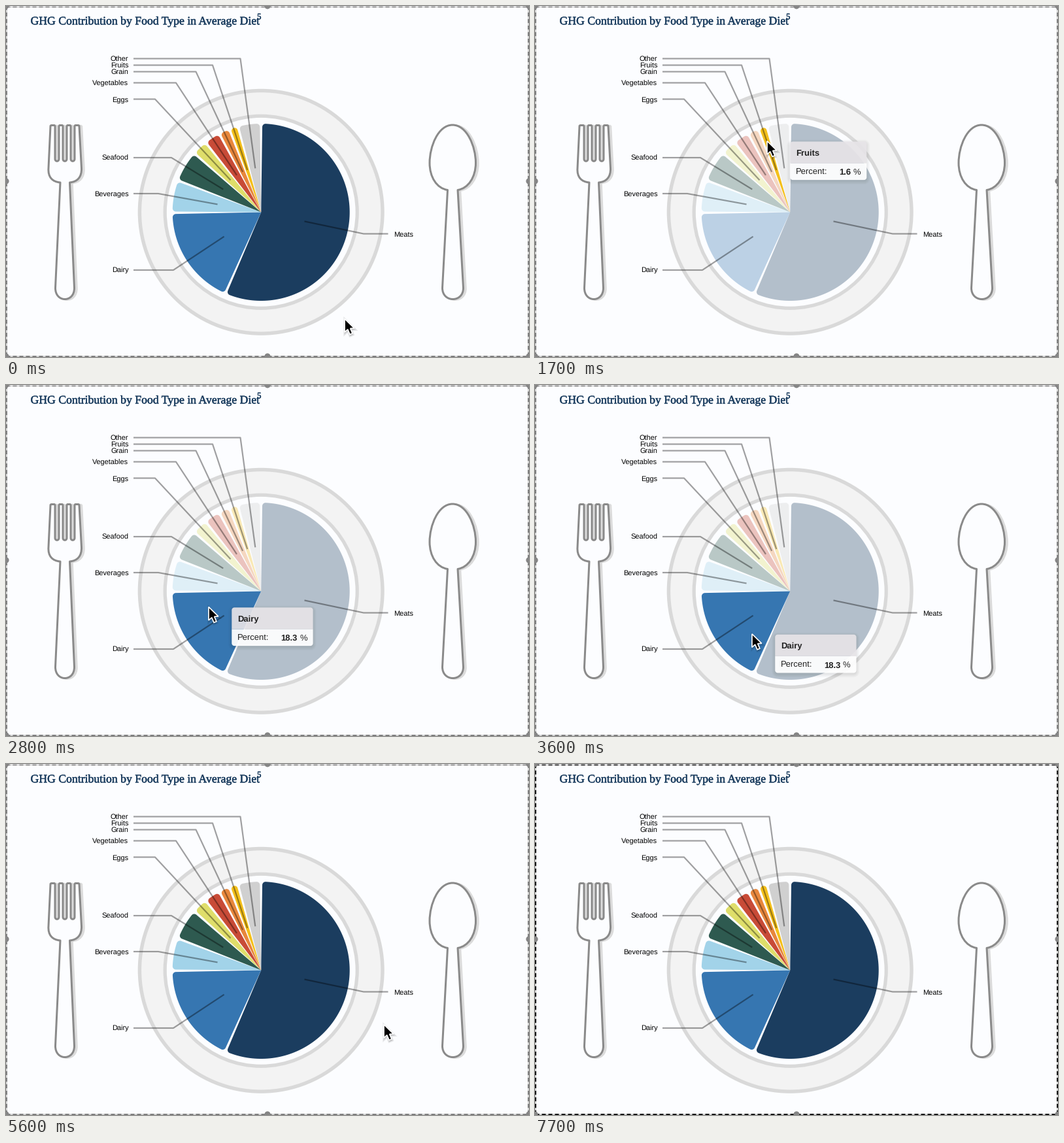
A matplotlib script that plays this animation: 800x537 px, repeating every 7.8 s.

```python
import numpy as np
import matplotlib.pyplot as plt
from matplotlib.animation import FuncAnimation
from matplotlib.patches import Circle, PathPatch, Polygon
from matplotlib.path import Path
from matplotlib.patheffects import withStroke

plt.rcParams.update({"text.hinting": "none", "text.hinting_factor": 1})

W, H, DPI = 800, 537, 100
FRAMES, INTERVAL = 78, 100
PX = 72 / DPI  # points per pixel
PAGE, NAVY = "#fcfdff", "#1b3d5f"
CX, CY, R = 390.2, 315.5, 135.5
FADED = 0.32

# name, percent, colour, label y, elbow x
SLICES = [
    ("Meats", 56.6, NAVY, 348.5, 547),
    ("Dairy", 18.3, "#3676b1", 404, 256),
    ("Beverages", 5.9, "#a2d3e9", 287, 233),
    ("Seafood", 5.7, "#2e5a50", 232, 253),
    ("Eggs", 2.8, "#dfde6a", 142.5, 228),
    ("Vegetables", 2.9, "#c84b37", 117.5, 260),
    ("Grain", 2.0, "#e8873c", 100.5, 290.5),
    ("Fruits", 1.6, "#f4c01b", 90.5, 316),
    ("Other", 4.2, "#d0d0d0", 80.5, 358.5),
]
BOUNDS = np.radians(3.6 * np.cumsum([0] + [s[1] for s in SLICES]))

# seconds, x, y of the pointer tip
KEYS = np.array([
    (0, 518, 478), (0.2, 510, 462), (0.4, 476, 400), (0.9, 414, 222),
    (1.4, 373, 202), (1.7, 355, 206), (1.9, 340, 212), (2.05, 325, 222),
    (2.25, 308, 236), (2.4, 295, 255), (2.6, 287, 297), (2.8, 310, 339),
    (3.4, 330, 378), (4.1, 334, 372), (4.7, 357, 366), (5.0, 400, 374),
    (5.3, 474, 386), (5.6, 578, 398), (5.9, 614, 396), (6.4, 604, 404),
    (6.9, 566, 548), (7.8, 560, 620),
])
ACTIVE_BORDER = 6.9

fig = plt.figure(figsize=(W / DPI, H / DPI), dpi=DPI, facecolor=PAGE)
ax = fig.add_axes([0, 0, 1, 1])
ax.set(xlim=(0, W), ylim=(H, 0))
ax.axis("off")


def polar(angle, radius):
    """Point at a clockwise angle from twelve o'clock."""
    return np.column_stack([CX + radius * np.sin(angle), CY - radius * np.cos(angle)])


def write(x, y, s, size, font="Liberation Sans", **kw):
    kw.setdefault("va", "baseline")
    return ax.text(x, y, s, fontsize=size * PX, family=font, **kw)


def stroke(points, color, width, **kw):
    xs, ys = zip(*points)
    kw.setdefault("solid_capstyle", "butt")
    return ax.plot(xs, ys, color=color, lw=width * PX, **kw)[0]


def slice_points(a0, a1, pad=0.014, corner=5):
    a0, a1 = a0 + pad, a1 - pad
    half = np.sin(min((a1 - a0) / 2, np.pi / 2))
    rc = min(corner, 0.98 * R * half / (1 + half))
    inset = np.arcsin(rc / (R - rc))
    turn = np.linspace(0, 1, 9)
    sweep = np.pi / 2 + inset
    first, last = polar(np.array([a0 + inset, a1 - inset]), R - rc)
    t0 = a0 - np.pi / 2 + turn * sweep
    t1 = a1 - inset + turn * sweep

    def arc(c, t):
        return c + rc * np.column_stack([np.sin(t), -np.cos(t)])

    rim = polar(np.linspace(a0 + inset, a1 - inset, 120), R)
    return np.vstack([[(CX, CY)], arc(first, t0), rim, arc(last, t1)])


def round_box(x, y, w, h, top, bottom):
    def corner(cx, cy, r, start):
        t = np.radians(np.linspace(start, start + 90, 7))
        return np.column_stack([cx + r * np.cos(t), cy + r * np.sin(t)])

    return np.vstack([
        corner(x + top, y + top, top, 180),
        corner(x + w - top, y + top, top, 270),
        corner(x + w - bottom, y + h - bottom, bottom, 0),
        corner(x + bottom, y + h - bottom, bottom, 90),
    ])


class Pen:
    """Collects the segments of a path."""

    def __init__(self, *start):
        self.pts, self.codes = [start], [Path.MOVETO]

    def line(self, *pts):
        self.pts += pts
        self.codes += [Path.LINETO] * len(pts)
        return self

    def curve(self, *pts):
        self.pts += pts
        self.codes += [Path.CURVE4] * len(pts)
        return self

    def close(self):
        self.pts.append(self.pts[0])
        self.codes.append(Path.CLOSEPOLY)
        return Path(self.pts, self.codes)


def cutlery(path):
    shadow = Path(path.vertices + (3.7, 0.8), path.codes)
    ax.add_patch(PathPatch(shadow, fc="#dbdbdb", ec="#dbdbdb", lw=3 * PX))
    ax.add_patch(PathPatch(path, fc=PAGE, ec="#8a8a8a", lw=3 * PX, joinstyle="round"))


def fork():
    pen = Pen(68, 184)
    pen.curve((68, 183), (68.5, 182.5), (70, 182.5))
    for x in (78, 90, 102):
        pen.line((x - 4.5, 182.5))
        pen.curve((x - 3.5, 182.5), (x - 3, 183), (x - 3, 184))
        pen.line((x - 3, 234))
        pen.curve((x - 3, 238.5), (x + 3, 238.5), (x + 3, 234))
        pen.line((x + 3, 184))
        pen.curve((x + 3, 183), (x + 3.5, 182.5), (x + 4.5, 182.5))
    pen.line((110, 182.5)).curve((111.5, 182.5), (112, 183), (112, 184))
    pen.line((115.5, 248)).curve((116, 262), (109, 269), (97.5, 270))
    pen.line((104.5, 431)).curve((105, 454.4), (75, 454.4), (75.5, 431))
    pen.line((83, 270)).curve((71, 269), (64, 262), (65, 248))
    return pen.close()


def spoon():
    pen = Pen(683, 182)
    pen.curve((661, 182), (648, 215), (648, 240))
    pen.curve((648, 262), (659, 279), (675.5, 281.5))
    pen.line((667.5, 431)).curve((667, 454.4), (700, 454.4), (699.5, 431))
    pen.line((691, 281.5)).curve((707, 279), (718.5, 262), (718.5, 240))
    pen.curve((718.5, 215), (705, 182), (683, 182))
    return pen.close()


# Plate and cutlery
for radius, fill, width in ((185.8, "#f3f3f3", 5.4), (147, PAGE, 5.2)):
    ax.add_patch(Circle((CX, CY - 0.2), radius, fc=fill, ec="#d9d9d9", lw=width * PX))
cutlery(fork())
cutlery(spoon())

# Pie, leader lines and labels
wedges = []
for (name, _, color, y, elbow), a0, a1 in zip(SLICES, BOUNDS, BOUNDS[1:]):
    wedge = Polygon(slice_points(a0, a1), fc=color, ec="none", zorder=2)
    wedges.append(ax.add_patch(wedge))
    right = name == "Meats"
    tip = polar(np.array([(a0 + a1) / 2]), R / 2)[0]
    stroke([(584.5 if right else 195, y), (elbow, y), tip], "black", 2.2,
           alpha=0.37, zorder=3, solid_joinstyle="round")
    write(593.5 if right else 187.3, y + 4, name, 10.9, color="black",
          ha="left" if right else "right", zorder=3)

# Title
title_fx = [withStroke(linewidth=0.35, foreground=NAVY)]
write(37.5, 28.3, "GHG Contribution by Food Type in Average Diet", 17.7,
      "Liberation Serif", color=NAVY, path_effects=title_fx)
write(384, 20.3, "5", 13, "Liberation Serif", color=NAVY, path_effects=title_fx)

# Selection border
EDGES = [((0, 0.5), (W, 0.5), 1.4), ((0.5, 0), (0.5, H), 1.8),
         ((799.3, 0), (799.3, H), 1.8), ((0, 535.5), (W, 535.5), 2.6)]
dashes = []
for p, q, width in EDGES:
    stroke([p, q], "#cfcfcf", width, zorder=4)
    dashes.append(stroke([p, q], "#777777", width, zorder=4,
                         ls=(0, (6 / width, 4 / width)), dash_capstyle="butt"))
for x in (0, 400, 800):
    for y in (0, 268, 536):
        if (x, y) != (400, 268):
            ax.add_patch(Circle((x, y), 4.6, fc="#858585", ec="none", zorder=5))

# Tooltip
shades = [ax.add_patch(Polygon([(0, 0)], fc="black", ec="none", alpha=0.014, zorder=6))
          for _ in range(6)]
body = ax.add_patch(Polygon([(0, 0)], fc="white", ec="none", alpha=0.95, zorder=7))
head = ax.add_patch(Polygon([(0, 0)], fc="#e8e5e9", ec="none", alpha=0.92, zorder=7))
tip_text = dict(color="#222222", zorder=8)
tip_name = write(0, 0, "", 13, weight="bold", **tip_text)
tip_label = write(0, 0, "Percent:", 13, **tip_text)
tip_value = write(0, 0, "", 13, weight="bold", ha="right", **tip_text)
tip_unit = write(0, 0, "%", 13, ha="right", **tip_text)
tooltip = [*shades, body, head, tip_name, tip_label, tip_value, tip_unit]

# Pointer
ARROW = np.array([(0, 0.5), (0, 21), (4.7, 16.7), (8, 24.4),
                  (11.9, 22.8), (8.7, 15.3), (14.8, 15)])
arrow_shade = [ax.add_patch(Polygon(ARROW, fc="black", ec="black", alpha=0.08,
                                    lw=w * PX, zorder=9)) for w in (2.5, 4.5)]
arrow = ax.add_patch(Polygon(ARROW, fc="black", ec="white", lw=1.7 * PX, zorder=10))


def pointer(t):
    """Cubic Hermite path through the keys."""
    ts, pts = KEYS[:, 0], KEYS[:, 1:]
    slopes = np.gradient(pts, ts, axis=0)
    i = min(np.searchsorted(ts, t, side="right") - 1, len(ts) - 2)
    h = ts[i + 1] - ts[i]
    u = (t - ts[i]) / h
    return ((1 + 2 * u) * (1 - u) ** 2 * pts[i] + u * (1 - u) ** 2 * h * slopes[i]
            + u * u * (3 - 2 * u) * pts[i + 1] + u * u * (u - 1) * h * slopes[i + 1])


def hovered(x, y):
    dx, dy = x - CX, y - CY
    if np.hypot(dx, dy) > R:
        return None
    angle = np.arctan2(dx, -dy) % (2 * np.pi)
    return min(np.searchsorted(BOUNDS, angle, side="right") - 1, len(SLICES) - 1)


def place_tooltip(x, y, name, percent):
    w, h, split = (124.3 if percent >= 10 else 117), 58.7, 33
    for k, shade in enumerate(shades):
        shade.set_xy(round_box(x - k, y + 2 - k, w + 2 * k, h + 2 * k, 4 + k, 4 + k))
    head.set_xy(round_box(x, y, w, split, 4, 0))
    body.set_xy(round_box(x, y + split, w, h - split, 0, 4))
    tip_name.set_text(name)
    tip_value.set_text(f"{percent:.1f}")
    tip_name.set_position((x + 9, y + 21.4))
    tip_label.set_position((x + 9, y + 50.6))
    tip_value.set_position((x + w - 24.2, y + 50.6))
    tip_unit.set_position((x + w - 9, y + 50.6))


def update(frame):
    t = frame * INTERVAL / 1000
    x, y = pointer(t)
    arrow.set_xy(ARROW + (x, y))
    for shade in arrow_shade:
        shade.set_xy(ARROW + (x + 0.5, y + 1.8))
    focus = hovered(x, y)
    for i, wedge in enumerate(wedges):
        wedge.set_alpha(1 if focus in (None, i) else FADED)
    for part in tooltip:
        part.set_visible(focus is not None)
    if focus is not None:
        place_tooltip(x + 35.3, y + 1.4, *SLICES[focus][:2])
    for dash in dashes:
        dash.set_color("black" if t >= ACTIVE_BORDER else "#777777")
    return []


anim = FuncAnimation(fig, update, frames=FRAMES, interval=INTERVAL,
                     repeat=True, repeat_delay=0, blit=False)
plt.show()
```
